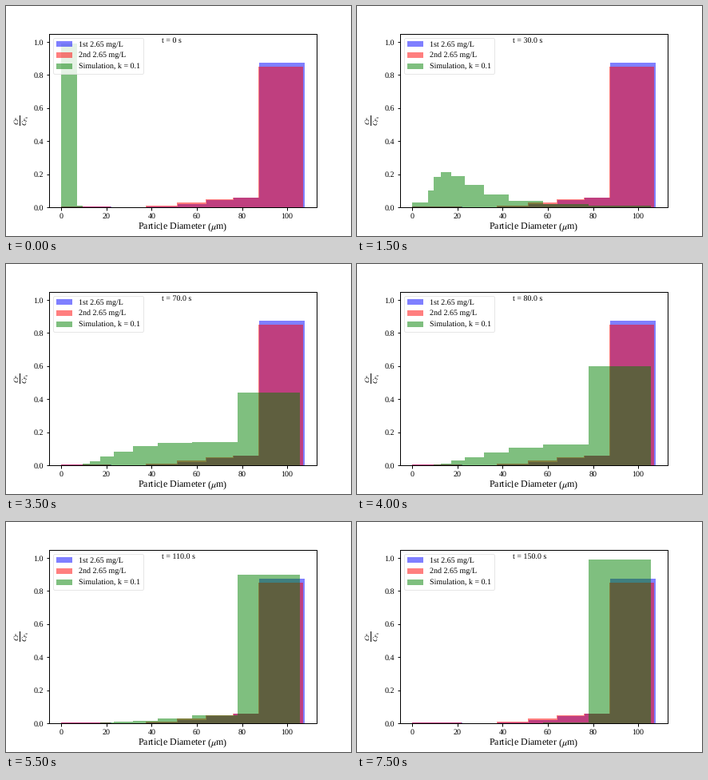
Write a matplotlib script that moves like this. It is 432 px wide and 288 px high and loops after 8000 ms.

```python
import math

import matplotlib.pyplot as plt
import numpy as np
from matplotlib.animation import FuncAnimation

plt.rcParams.update({
    "font.family": "Liberation Serif",
    "mathtext.fontset": "stix",
    "font.size": 10,
    "text.hinting": "none",
    "axes.linewidth": 1,
    "xtick.major.width": 1,
    "ytick.major.width": 1,
    "legend.edgecolor": "0.88",
})

FRAMES, INTERVAL = 16, 500
STEP = 10.0       # simulated seconds per frame
RATE = 0.1175     # growth steps per second
BINS = 10
START = (0.99, 0.01)

# Geometric size classes, the first one reaching down to zero
sim_edges = np.r_[0, 105.7 / 1.3525 ** np.arange(BINS - 1, -1, -1)]

edges = np.array([0, 22, 37.5, 51.2, 64, 76, 87.3, 107.1])
first = [0.004, 0.002, 0.004, 0.020, 0.044, 0.058, 0.874]
second = [0.003, 0.002, 0.010, 0.029, 0.048, 0.058, 0.850]


def chain(mean):
    """Class shares after a Poisson number of growth steps."""
    p = [math.exp(-mean) * mean ** n / math.factorial(n) for n in range(BINS)]
    share = START[0] * np.array(p) + START[1] * np.r_[0, p[:-1]]
    share[-1] = 1 - share[:-1].sum()
    return share


def histogram(ax, edges, heights, color, label):
    return ax.bar(edges[:-1], heights, np.diff(edges), align="edge",
                  color=color, alpha=0.5, label=label)


fig, ax = plt.subplots(figsize=(6, 4), dpi=72)
fig.subplots_adjust(left=0.125, right=0.9, bottom=0.125, top=0.88)

histogram(ax, edges * 1.0046, first, "blue", "1st 2.65 mg/L")
histogram(ax, edges, second, "red", "2nd 2.65 mg/L")
sim = histogram(ax, sim_edges, chain(0), "green", "Simulation, k = 0.1")
clock = ax.text(0.42, 0.95, "", transform=ax.transAxes)

ax.set_xlim(-5.38, 112.98)
ax.set_ylim(0, 1.05)
ax.set_xlabel(r"Particle Diameter ($\mu$m)", fontsize=12, labelpad=1)
ax.set_ylabel(r"$\frac{C_P}{C_{P_0}}$", fontsize=12)
ax.legend(loc="upper left")


def update(i):
    t = i * STEP
    for bar, h in zip(sim, chain(RATE * t)):
        bar.set_height(h)
    clock.set_text(f"t = {t} s" if i else "t = 0 s")
    return [*sim, clock]


anim = FuncAnimation(fig, update, frames=FRAMES, interval=INTERVAL,
                     repeat=True, repeat_delay=0, blit=False)
plt.show()
```
